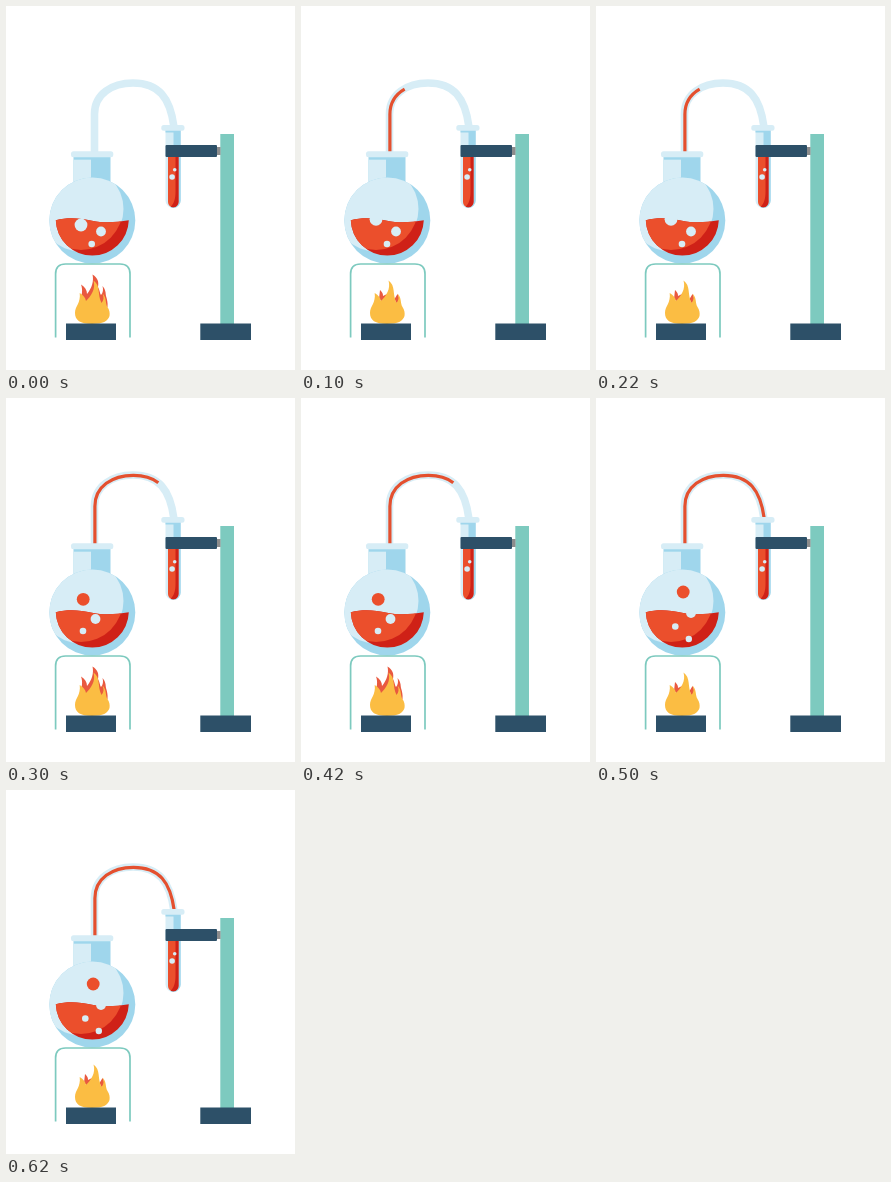
These frames come from a looping animation (289 px wide and 364 px high, 700 ms). An HTML page:

```html
<!DOCTYPE html>
<html lang="en">
<head>
<meta charset="utf-8">
<title>Distillation</title>
<style>
html, body { margin: 0; width: 100%; height: 100%; overflow: hidden; background: #fff }
svg { display: block }
.pale { fill: #d7edf6 }
.shade { fill: #9fd6ec }
.red { fill: #eb4f2c }
.dark { fill: #cf2117 }
.navy { fill: #2d5068 }
.teal { fill: #7dcabf }
.line { fill: none }
</style>
</head>
<body>
<svg width="289" height="364" viewBox="0 0 289 364">
  <defs>
    <path id="pipe" pathLength="100" d="M88.500 146V108C88.500 88 106 77 127 77C153 77 164 92 167.800 120"/>
    <path id="liquid" d="M49.800 214.300C62 211.300 73 212 86 214.800C98 217.200 110 216.500 122.800 214.300A36.520 36.520 0 0 1 49.800 214.300Z"/>
    <path id="glass" d="M159.500 124H174.700V194.500A7.600 7.600 0 0 1 159.500 194.500Z"/>
    <path id="vial" d="M162 145H172.500V196A5.250 5.250 0 0 1 162 196Z"/>
    <clipPath id="bulbClip"><circle cx="86.300" cy="214.500" r="43"/></clipPath>
    <clipPath id="liquidClip"><use href="#liquid"/></clipPath>
    <clipPath id="glassClip"><use href="#glass"/></clipPath>
    <clipPath id="vialClip"><use href="#vial"/></clipPath>
  </defs>

  <!-- stand and test tube -->
  <rect class="teal" x="214.300" y="128" width="13.700" height="190"/>
  <rect class="navy" x="194.300" y="317.500" width="50.700" height="16.500"/>
  <use href="#pipe" class="line" stroke="#d7edf6" stroke-width="7.600"/>
  <use id="flow" href="#pipe" class="line" x=".4" y=".3" stroke="#e4502f" stroke-width="3.200"/>
  <use href="#glass" class="pale"/>
  <path class="shade" clip-path="url(#glassClip)" d="M159 124H175V203H164Q167.500 198 167.500 190V126.500H159Z"/>
  <use href="#vial" class="red"/>
  <path class="dark" clip-path="url(#vialClip)" d="M169.500 145H175V203H162C168 199 169.500 193 169.500 186Z"/>
  <g class="pale">
    <circle cx="168.700" cy="163.700" r="1.800"/>
    <circle cx="166.100" cy="171" r="2.800"/>
    <rect x="155.300" y="119" width="23.200" height="5.700" rx="2.500"/>
  </g>
  <rect x="210" y="141" width="4.500" height="8" fill="#8c8c8c"/>
  <rect class="navy" x="159.500" y="139" width="51.500" height="12" rx="1"/>

  <!-- flask -->
  <rect class="shade" x="67.500" y="149" width="37" height="32"/>
  <rect class="pale" x="67.500" y="153.700" width="17.500" height="27"/>
  <rect class="pale" x="65" y="145.300" width="42.300" height="6" rx="2.500"/>
  <circle class="shade" cx="86.300" cy="214.500" r="43"/>
  <circle class="pale" cx="75" cy="203" r="42.500" clip-path="url(#bulbClip)"/>
  <use href="#liquid" class="dark"/>
  <circle class="red" cx="75" cy="202" r="42" clip-path="url(#liquidClip)"/>
  <g id="bubbles"></g>

  <!-- burner and tripod -->
  <path class="line" stroke="#7dcabf" stroke-width="1.700" d="M49.600 331.500V268Q49.600 258 59.600 258H114Q124 258 124 268V331.500"/>
  <path id="glow" fill="#e9593f"/>
  <path fill="#fbbd43" d="M86 318C74 318 69 314 69 307C69 300 75 297 73.700 287C77.500 289 79.500 292 80 295C85 290 90 283 87.500 274.500C95 280 91 288 95.500 297C98 294 98 291 96.500 287.500C101 292 99 297 101.500 301C103.500 304 104 307 103.500 310C102 315 97 318 86 318Z"/>
  <rect class="navy" x="60" y="317.500" width="50" height="16.500"/>
</svg>
<script>
const $ = id => document.getElementById(id);
const high = "M74 295C76 289 77 284 75 278.500C79 281 81 284 81 288C86 282 88 275 86.500 268.500C92 272 93 276 92 281C94 285 94 288 95 289C97 287 97.500 283 96.500 280C100 284 99.500 287 100 290C101 293 102 297 101.500 301L90 305Z";
const low = "M79 284C82 287 82 288 82 290L86 288L82 296L78 293ZM96.500 288C99 292 98.500 295 96 298L93.500 293Z";

// bubbles: x, y, radius; those in the vapour are red
const poses = [
  { end: 100, flow: 0, glow: high, bubbles: [[75, 219, 6.400], [95, 225.500, 4.900], [85.700, 238, 3.300]] },
  { end: 300, flow: 43, glow: low, bubbles: [[75, 213.300, 6.400], [95, 225.500, 4.900], [86, 238, 3.300]] },
  { end: 500, flow: 75, glow: high, bubbles: [[77.200, 201.300, 6.400], [89.500, 221, 4.900], [77, 233, 3.300]] },
  { end: 700, flow: 100, glow: low, bubbles: [[87.200, 194, 6.400], [95, 215, 4.900], [79.300, 228.500, 3.300], [92.800, 241, 3.200]] }
];

let shown;
function draw(now) {
  const pose = poses.find(p => now % 700 < p.end);
  if (pose === shown) return;
  shown = pose;
  $("flow").setAttribute("stroke-dasharray", `${pose.flow} 200`);
  $("flow").setAttribute("visibility", pose.flow ? "visible" : "hidden");
  $("glow").setAttribute("d", pose.glow);
  $("bubbles").innerHTML = pose.bubbles.map(([x, y, r]) =>
    `<circle cx="${x}" cy="${y}" r="${r}" class="${y < 205 ? "red" : "pale"}"/>`).join("");
}

const start = performance.now();
function tick() {
  draw(performance.now() - start);
  requestAnimationFrame(tick);
}
tick();
</script>
</body>
</html>
```
